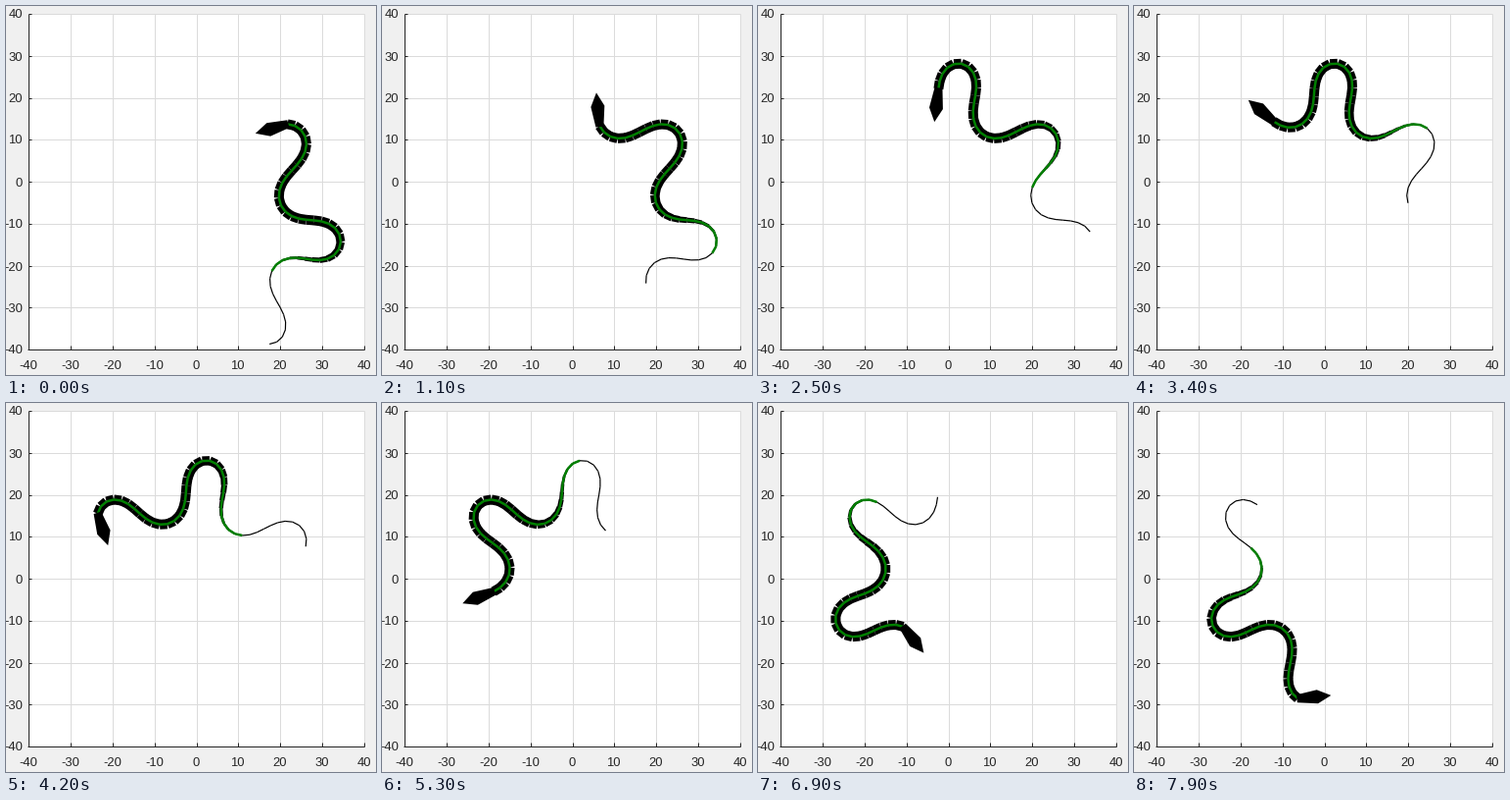
A matplotlib script for the animation above (8 s loop, 378 by 376 pixels).

```python
import numpy as np
import matplotlib.pyplot as plt
from matplotlib.animation import FuncAnimation
from matplotlib.collections import LineCollection
from matplotlib.patches import Polygon

W, H, DPI = 378, 376, 100
PT = 72 / DPI  # points per pixel
FRAMES, INTERVAL = 80, 100
LEFT, RIGHT, TOP, BOTTOM = 22.5, 365.5, 7.5, 349.5
INK, GRID = "#262626", "#dbdbdb"

WAVE, SWING = 173, 78  # length in pixels and swing in degrees of one slither
SEGMENT, BODY, HEAD = 8.35, 374, 34
THIN = 92  # length of the bare tail


def slither(length):
    """Track whose heading swings like a sine around a slowly turning course."""
    s = np.arange(0, length, 0.5)
    u = s / WAVE - 0.05
    course = np.interp(u, [-0.25, 1.75, 2.25, 6.25], [15, 125, 128, 366])
    heading = np.radians(course + SWING * np.sin(2 * np.pi * u))
    xy = np.cumsum(np.column_stack([np.cos(heading), -np.sin(heading)]), axis=0)
    # Fit the track to the stretch of the plot it covers
    low, high = np.array([79, 58.5]), np.array([342, 344.5])
    return s, low + (xy - xy.min(axis=0)) / np.ptp(xy, axis=0) * (high - low)


def smoothstep(t):
    t = np.clip(t, 0, 1)
    return t * t * (3 - 2 * t)


arc, track = slither(1080)


def at(s):
    return np.stack([np.interp(s, arc, track[:, k]) for k in (0, 1)], axis=-1)


def crawled(i):
    """Distance the tail tip has gone: slow start, short sprint midway."""
    return np.interp(i, [0, 11, 42, 54, 79], [0, 78, 335, 451, 666])


fig = plt.figure(figsize=(W / DPI, H / DPI), dpi=DPI, facecolor="#f0f0f0")
ax = fig.add_axes([0, 0, 1, 1])
ax.set(xlim=(0, W), ylim=(H, 0))
ax.axis("off")


def line(x, y, color):
    ax.plot(x, y, color=color, lw=PT, solid_capstyle="butt", zorder=1)


ax.add_patch(plt.Rectangle((LEFT, TOP), RIGHT - LEFT, BOTTOM - TOP,
                           fc="white", ec="none", zorder=0))
xs = np.floor(np.linspace(LEFT, RIGHT, 9)) + 0.5
ys = np.floor(np.linspace(BOTTOM, TOP, 9)) + 0.5
for x, y in zip(xs, ys):
    line([x, x], [TOP, BOTTOM], GRID)
    line([LEFT, RIGHT], [y, y], GRID)
font = dict(family="Liberation Sans", size=13 * PT, color=INK)
for x, y, v in zip(xs, ys, range(-40, 41, 10)):
    line([x, x], [BOTTOM, BOTTOM - 3.5], INK)
    line([LEFT, LEFT + 3.5], [y, y], INK)
    ax.text(x, 370, v, ha="center", va="baseline", **font)
    ax.text(17, y + 5, v, ha="right", va="baseline", **font)
line([LEFT, LEFT], [TOP, BOTTOM + 0.5], INK)
line([LEFT - 0.5, RIGHT], [BOTTOM, BOTTOM], INK)

# Joints from tail to neck; flat link ends leave the gaps on the bends
joints = np.linspace(0, BODY, round(BODY / SEGMENT) + 1)
mid = (joints[1:] + joints[:-1]) / 2
width = 1.2 + 8.8 * smoothstep((mid - 85) / 130)
skin = LineCollection([], colors="black", linewidths=width * PT,
                      capstyle="butt", zorder=3)
spine = LineCollection([], colors="#008000", linewidths=2.5 * PT,
                       capstyle="butt", zorder=4)
head = Polygon(np.zeros((5, 2)), closed=True, fc="black", ec="none", zorder=5)
for art in (skin, spine):
    ax.add_collection(art)
ax.add_patch(head)


def draw(i):
    start = crawled(i)
    pts = at(start + joints)
    links = np.stack([pts[:-1], pts[1:]], axis=1)
    skin.set_segments(links)
    spine.set_segments(links[mid > THIN])
    neck = pts[-1]
    d = at(start + BODY + 22) - neck
    d /= np.hypot(*d)
    side = np.array([-d[1], d[0]])
    shape = [(-1, 4), (20, 7), (HEAD, 0), (20, -7), (-1, -4)]
    head.set_xy([neck + f * d + w * side for f, w in shape])
    return skin, spine, head


anim = FuncAnimation(fig, draw, frames=FRAMES, interval=INTERVAL,
                     repeat=True, repeat_delay=0, blit=False)
plt.show()
```
